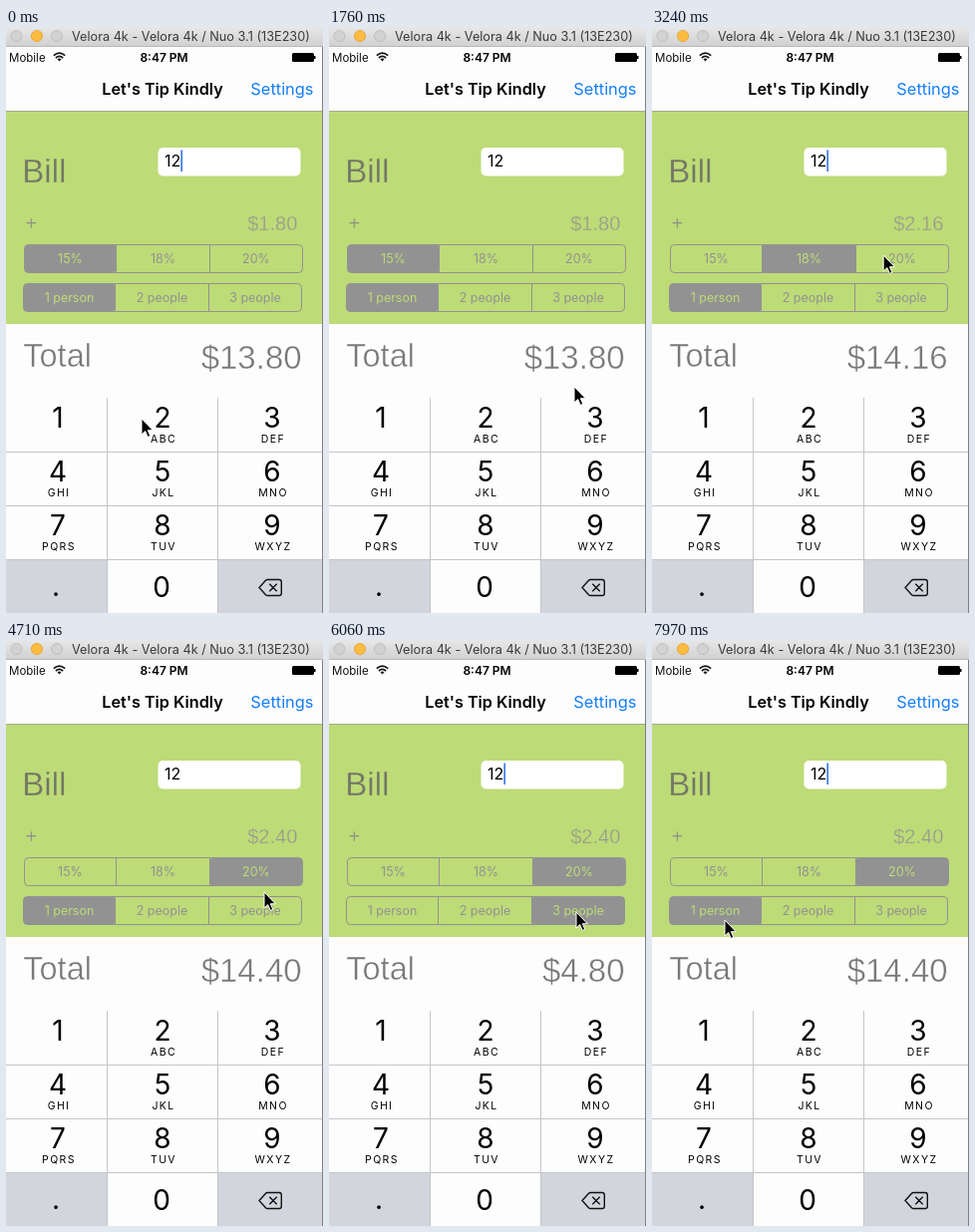
An HTML page for the animation above (8000 ms loop, 318 by 587 pixels).

```html
<!DOCTYPE html>
<html lang="en">
<head>
<meta charset="utf-8">
<title>Tip calculator</title>
<style>
  html, body { margin: 0; width: 100%; height: 100%; overflow: hidden; background: #fdfdfd; }
  svg { display: block; width: 318px; height: 587px; }
  text { font-family: Inter, "Noto Sans", sans-serif; white-space: pre; }
  /* a background-coloured outline thins the letters to a light weight */
  .big { font-family: "Liberation Sans", Arial, sans-serif; stroke: #fdfdfd; stroke-width: .5; }
  .panel { stroke: #bddb77; stroke-width: .35; }
  .mid { text-anchor: middle; }
  .end { text-anchor: end; }
</style>
</head>
<body>
<svg viewBox="0 0 318 587">
  <defs>
    <linearGradient id="bar" x2="0" y2="1">
      <stop stop-color="#e6e6e6"/><stop offset="1" stop-color="#d0d0d0"/>
    </linearGradient>
  </defs>

  <!-- window bar -->
  <rect width="318" height="19" fill="url(#bar)"/>
  <path d="M0 18.5H318" stroke="#b9b9b9"/>
  <g stroke-width=".8">
    <circle cx="10.5" cy="8" r="5.6" fill="#d2d2d2" stroke="#b9b9b9"/>
    <circle cx="31" cy="8" r="5.6" fill="#fdbc40" stroke="#dfa034"/>
    <circle cx="51" cy="8" r="5.6" fill="#d2d2d2" stroke="#b9b9b9"/>
  </g>
  <text x="66" y="13" font-size="12.7" fill="#3a3a3a">Velora 4k - Velora 4k / Nuo 3.1 (13E230)</text>

  <!-- status and navigation -->
  <text x="3" y="33.5" font-size="11.5" fill="#111">Mobile</text>
  <g fill="none" stroke="#111" stroke-width="1.7">
    <path d="M47.8 27.6Q53.5 22.6 59.2 27.6M49.9 30Q53.5 26.9 57.1 30"/>
    <path d="M51.5 31.3Q53.5 29.7 55.5 31.3L53.5 33.6Z" fill="#111" stroke="none"/>
  </g>
  <text class="mid" x="158.5" y="33.5" font-size="12" font-weight="600">8:47 PM</text>
  <rect x="287" y="25" width="22" height="9" rx="1.5"/>
  <path d="M309 28h1.5v3H309z"/>
  <text class="mid" x="157" y="67" font-size="16.2" font-weight="600">Let's Tip Kindly</text>
  <text class="end" x="308.5" y="67" font-size="16.4" fill="#157efb">Settings</text>

  <!-- bill panel -->
  <rect y="83" width="318" height="214" fill="#bddb77"/>
  <path d="M0 83.5H318" stroke="#a3ab90"/>
  <text class="big panel" x="16.3" y="154.5" font-size="33" fill="#727566">Bill</text>
  <rect x="152.5" y="120" width="143" height="28.5" rx="5" fill="#fff"/>
  <text x="159" y="139.3" font-size="16">12</text>
  <path id="caret" d="M176.2 122.5V144" stroke="#3d78e6" stroke-width="1.7"/>
  <text class="big panel" x="19.5" y="203" font-size="20" fill="#8c8f86">+</text>
  <text class="big panel end" id="tip" x="292.3" y="203" font-size="20" fill="#96998f"></text>
  <g id="rates"></g>
  <g id="people"></g>

  <!-- total -->
  <text class="big" x="17.3" y="339.8" font-size="32.5" fill="#787878">Total</text>
  <text class="big end" id="total" x="296.6" y="341.6" font-size="33" fill="#787878"></text>

  <!-- keypad -->
  <path d="M0 533.5h101.5V587H0zM212.5 533.5H318V587H212.5z" fill="#d2d5db"/>
  <path d="M101.5 371V587M212.5 371V587M0 425.5H318M0 479.5H318M0 533.5H318" stroke="#c3c5c9"/>
  <g id="keys"></g>
  <path d="M254 561.5L260.5 554.3Q261.3 553.5 262.5 553.5H274Q276.3 553.5 276.3 555.8V567.2Q276.3 569.5 274 569.5H262.5Q261.3 569.5 260.5 568.7ZM264.3 557.8L271.7 565.2M271.7 557.8L264.3 565.2" fill="none" stroke="#111" stroke-width="1.4"/>
  <path d="M317.5 19V587" stroke="#808080"/>

  <path id="cursor" d="M0 0V16L3.7 12.6L6.2 18.4L8.8 17.3L6.3 11.7H11.3Z" fill="#000" stroke="#fff" stroke-width="1"/>
</svg>
<script>
const LOOP = 8000, STEP = 147.5, LAG = 10;
const GREY = '#929292', GREEN = '#bddb77';
const $ = id => document.getElementById(id);

const label = (x, y, size, text, fill = '#000', extra = '') =>
  `<text class="mid" x="${x}" y="${y}" font-size="${size}" fill="${fill}" ${extra}>${text}</text>`;

// Keypad
const letters = ['', 'ABC', 'DEF', 'GHI', 'JKL', 'MNO', 'PQRS', 'TUV', 'WXYZ'];
const columns = [52, 157, 267];
$('keys').innerHTML = letters.map((word, i) => {
  const x = columns[i % 3], y = 401 + 54 * Math.floor(i / 3);
  return label(x, y, 28, i + 1) + label(x + 1, y + 15, 10.5, word, '#000', 'letter-spacing="1.4"');
}).join('') + label(156, 571, 28, 0) + label(50, 570, 28, '.');

// Segmented controls
function segments(id, x, y, names, chosen) {
  const edges = [x, x + 92, x + 186, x + 279];
  const body = names.map((name, i) => {
    const on = i === chosen, left = edges[i], width = edges[i + 1] - left;
    const box = on ? `<rect x="${left}" y="${y}" width="${width}" height="28" rx="${i === 1 ? 0 : 4}" fill="${GREY}"/>` : '';
    return box + label(left + width / 2, y + 18.5, 12.5, name, on ? GREEN : GREY);
  }).join('');
  $(id).innerHTML = body +
    `<path d="M${edges[1]} ${y}v28M${edges[2]} ${y}v28" stroke="${GREY}"/>` +
    `<rect x="${x}" y="${y}" width="279" height="28" rx="4" fill="none" stroke="${GREY}"/>`;
}

// Pointer path: time, x, y
const path = [
  [0, 136, 392], [200, 136, 392], [850, 282, 386], [1330, 260, 373], [1470, 258, 370],
  [1620, 258, 370], [1760, 246, 360], [2250, 172, 236], [2500, 168, 228], [2850, 168, 228],
  [3240, 233, 228], [3540, 256, 229], [4560, 256, 229], [4710, 259, 252], [5000, 249, 271],
  [5460, 248, 272], [6060, 248, 272], [6430, 190, 277], [6800, 184, 278], [6950, 180, 278],
  [7450, 80, 280], [7700, 73, 280], [8000, 73, 280]
];

function pointer(t) {
  const i = Math.max(1, path.findIndex(p => p[0] >= t));
  const [t0, x0, y0] = path[i - 1], [t1, x1, y1] = path[i];
  const k = (t - t0) / (t1 - t0);
  return [x0 + (x1 - x0) * k, y0 + (y1 - y0) * k];
}

function caretVisible(t) {
  const phase = t % 1000;
  return phase < 420 || phase >= 770;
}

let shown = '';
function update(rate, people) {
  const state = `${rate},${people}`;
  if (state === shown) return;
  shown = state;
  const bill = 12, rates = [15, 18, 20], tip = bill * rates[rate] / 100;
  segments('rates', 18.5, 217.5, rates.map(r => r + '%'), rate);
  segments('people', 17.5, 256.5, ['1 person', '2 people', '3 people'], people);
  $('tip').textContent = '$' + tip.toFixed(2);
  $('total').textContent = '$' + ((bill + tip) / (people + 1)).toFixed(2);
}

function draw(now) {
  const t = now % LOOP;
  // the screen refreshes in fixed steps
  const s = Math.max(0, Math.floor((t + LAG) / STEP) * STEP - LAG);
  const rate = s < 2480 ? 0 : s < 4080 ? 1 : 2;
  const people = s < 5130 ? 0 : s < 6450 ? 2 : s < 7600 ? 1 : 0;
  update(rate, people);
  $('caret').style.opacity = caretVisible(s) ? 1 : 0;
  $('cursor').setAttribute('transform', `translate(${pointer(s)})`);
}

const start = performance.now();
function frame() {
  draw(performance.now() - start);
  requestAnimationFrame(frame);
}
frame();
</script>
</body>
</html>
```
